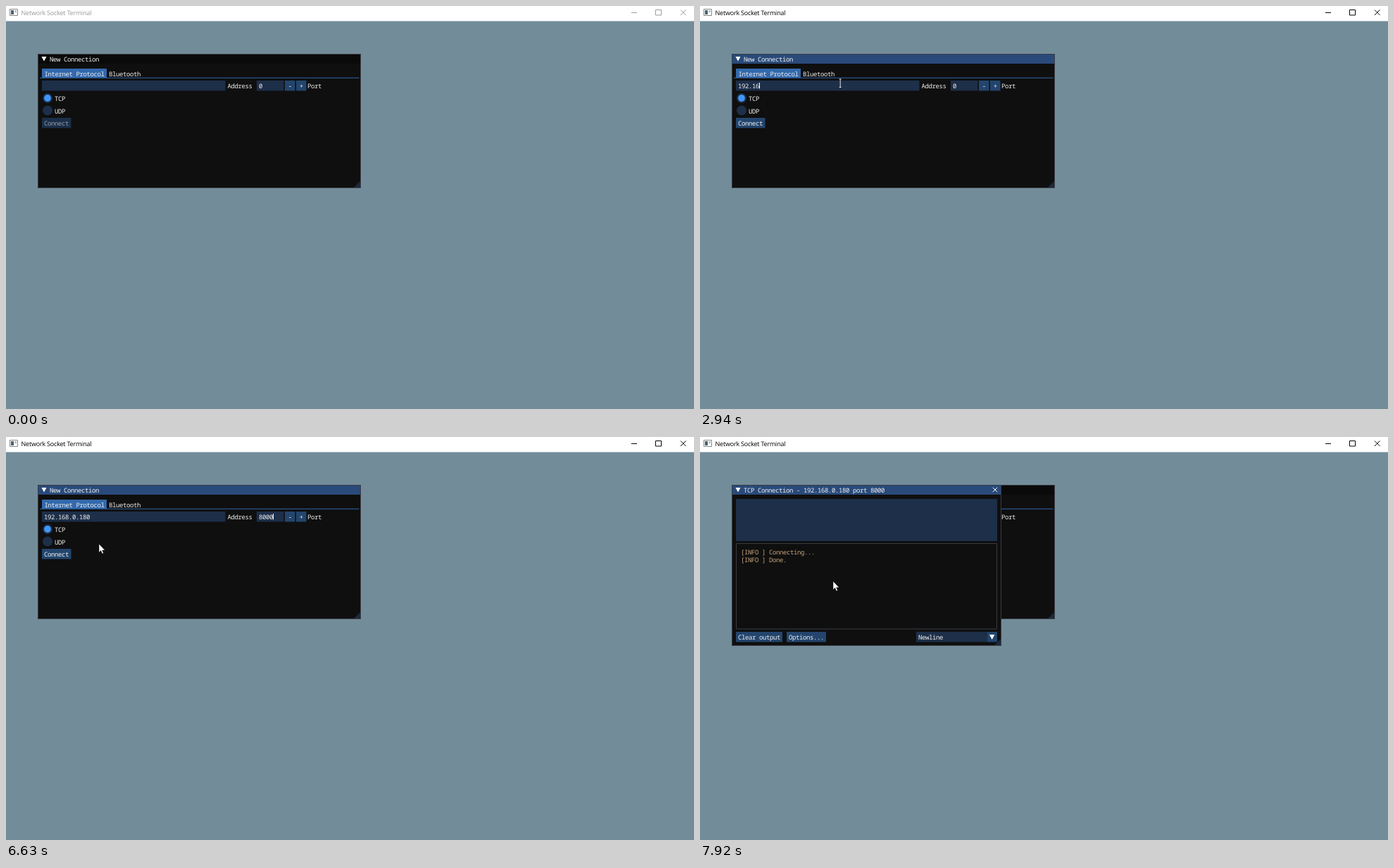
Animation of 977x573 px, one loop 7.99 s. Source, as an HTML page:

```html
<!DOCTYPE html>
<html lang="en">
<head>
<meta charset="utf-8">
<title>Network Socket Terminal</title>
<style>
  html, body { margin: 0; width: 100%; height: 100%; overflow: hidden; background: #738c99; }
  svg { display: block; width: 977px; height: 573px; }
  text {
    font: 9px "Noto Sans Mono", "DejaVu Sans Mono", monospace;
    letter-spacing: -.4px; fill: #f0f0f0; white-space: pre;
    text-rendering: geometricPrecision;
  }
  #caption text { font: 9px "Open Sans", "Noto Sans", sans-serif; letter-spacing: -.2px; fill: currentColor; }
</style>
</head>
<body>
<svg id="stage" width="977" height="573" viewBox="0 0 977 573"></svg>
<script>
const LOOP = 7990;
const C = {
  window: '#0f0f0f', border: '#3b3c43', title: '#294a7a', titleOff: '#0a0a0a',
  field: '#1d2f49', button: '#23456d', hover: '#4296fa', pressed: '#0f87fa',
  disabled: '#1b2f49', tab: '#3369ad', grip: '#1a2a3e', select: '#2a5387',
  text: '#f0f0f0', dim: '#929ba5', log: '#c9a27c'
};

const stage = document.getElementById('stage');

function add(parent, tag, attrs = {}, content) {
  const el = document.createElementNS('http://www.w3.org/2000/svg', tag);
  set(el, attrs);
  if (content !== undefined) el.textContent = content;
  return parent.appendChild(el);
}
function set(el, attrs) {
  for (const key in attrs) el.setAttribute(key, attrs[key]);
}
const group = (parent, id) => add(parent, 'g', id ? { id } : {});
const rect = (p, x, y, width, height, fill) => add(p, 'rect', { x, y, width, height, fill });
const shape = (p, d, fill) => add(p, 'path', { d, fill });
const line = (p, d, stroke, width = 1) =>
  add(p, 'path', { d, fill: 'none', stroke, 'stroke-width': width });
const label = (p, x, y, str, fill = C.text) => add(p, 'text', { x, y, style: `fill:${fill}` }, str);
const show = (el, on) => set(el, { visibility: on ? 'visible' : 'hidden' });

function button(p, x, y, w, str) {
  const box = rect(p, x, y, w, 14.5, C.button);
  return { box, text: label(p, x + 3, y + 11, str) };
}

function panel(p, w, h, name) {
  rect(p, 45, 68, w, h, C.window);
  const bar = rect(p, 45, 68, w, 14, C.title);
  const r = 45 + w, b = 68 + h;
  shape(p, `M${r} ${b}h-11l11 -11z`, C.grip);
  line(p, `M45.5 68.5h${w - 1}v${h - 1}h${1 - w}z`, C.border);
  shape(p, 'M50.5 72h7l-3.5 6.5z', '#fff');
  label(p, 62, 79, name);
  return bar;
}

// Desktop and caption bar
rect(stage, 0, 0, 977, 573, '#738c99');
rect(stage, 0, 0, 977, 21.5, '#fff');
const caption = group(stage, 'caption');
add(caption, 'text', { x: 21.5, y: 13 }, 'Network Socket Terminal');
line(caption, 'M888 9.5h8M922.5 5.5h8v7.5h-8zM958 5.5l7.5 7.5M965.5 5.5l-7.5 7.5', 'currentColor');
line(stage, 'M5.5 4.5h11v9h-11z', '#85898c');
rect(stage, 7, 6, 4, 6, '#4b6272');
rect(stage, 12.5, 6, 2.5, 3, '#b4bbc0');

// New connection form
const form = group(stage);
const formBar = panel(form, 459, 191, 'New Connection');
rect(form, 51, 89, 92, 13, C.tab);
rect(form, 48, 101.7, 453.5, 1, C.tab);
label(form, 54.5, 100, 'Internet Protocol');
label(form, 146, 100, 'Bluetooth');
rect(form, 51, 106, 260.5, 14.5, C.field);
label(form, 314.5, 117, 'Address');
rect(form, 356, 106, 38.5, 14.5, C.field);
for (const [x, sign] of [[396, '-'], [412, '+']]) {
  rect(form, x, 106, 14.5, 14.5, C.button);
  label(form, x + 4.8, 117, sign);
}
label(form, 428, 117, 'Port');
for (const [y, name] of [[131, 'TCP'], [148.5, 'UDP']]) {
  add(form, 'circle', { cx: 59, cy: y, r: 7, fill: C.field });
  label(form, 69, y + 4, name);
}
add(form, 'circle', { cx: 59, cy: 131, r: 4.9, fill: C.hover });
const connect = button(form, 51, 159, 41.5, 'Connect');
const selection = rect(form, 359, 107, 5.5, 12, C.select);
const address = label(form, 54, 117, '');
const port = label(form, 359, 117, '0');
const caret = rect(form, 54, 109, 1, 8.5, '#fff');

// Session window
const session = group(stage);
panel(session, 383, 229, 'TCP Connection - 192.168.0.180 port 8000');
line(session, 'M415.8 71.8l6.4 6.4M422.2 71.8l-6.4 6.4', '#fff');
rect(session, 51, 88, 371, 60, C.field);
line(session, 'M51.5 151.5h370v121.5h-370z', C.border);
label(session, 58, 166.5, '[INFO ] Connecting...', C.log);
const done = label(session, 58, 177.5, '[INFO ] Done.', C.log);
button(session, 51, 277, 66, 'Clear output');
button(session, 123, 277, 56, 'Options...');
rect(session, 307, 277, 101, 14.5, C.field);
rect(session, 408, 277, 14, 14.5, C.button);
shape(session, 'M411 281h7.4l-3.7 7z', '#fff');
label(session, 310, 288, 'Newline');

// Pointer
const halo = add(stage, 'circle', { r: 9.3, fill: '#fff000', 'fill-opacity': .58 });
const arrow = add(stage, 'path', {
  d: 'M0 0V12.2L2.7 9.6L4.6 14L6.5 13.2L4.7 9H8.5Z',
  fill: '#fff', stroke: '#000', 'stroke-width': .5
});
const beam = line(stage, 'M197.7 104h3M199.2 104v11.5M197.7 115.5h3', '#e4e4e4');

const ADDRESS = '192.168.0.180', PORT = '8000';
const addressKeys = [2010, 2210, 2340, 2540, 2740, 2940, 3210, 3410, 3610, 3880, 4080, 4350, 4500];
const portKeys = [5960, 6090, 6230, 6360];
const typed = (keys, t) => keys.filter(k => k <= t).length;

// Each move: start, end, number of held positions, from, to, easing
const inOut = u => u * u * (3 - 2 * u);
const out = u => 1 - (1 - u) ** 2;
const moves = [
  [270, 810, 9, [881, 537], [197, 109.5], inOut],
  [6430, 6630, 4, [190, 116], [132, 152], u => u],
  [6700, 6840, 3, [112, 157], [62, 164.5], out],
  [7510, 7920, 7, [64, 166], [189, 205], inOut]
];

function pointer(t) {
  let pos = moves[0][3];
  for (const [start, end, count, from, to, ease] of moves) {
    if (t < start) break;
    const step = (end - start) / (count - 1);
    // The small allowance absorbs times rounded to 10 ms.
    const held = Math.min(count - 1, Math.floor((t - start + 4) / step));
    const u = ease(held / (count - 1));
    pos = from.map((v, i) => v + (to[i] - v) * u);
    if (start === 270 && t >= end) pos = [197, 109.5];
  }
  return pos;
}

function draw(t) {
  const within = (a, b) => t >= a && t < b;
  const opened = t >= 7180;
  const n = typed(addressKeys, t), m = typed(portKeys, t);

  caption.style.color = t < 1130 ? '#999' : '#000';
  set(formBar, { fill: within(1210, 7180) ? C.title : C.titleOff });
  address.textContent = ADDRESS.slice(0, n);
  port.textContent = m ? PORT.slice(0, m) : '0';
  show(selection, within(4830, portKeys[0]));
  show(caret, within(1280, 4830) || within(portKeys[0], 7040));
  set(caret, { x: t < 4830 ? 54 + 5 * n : 359 + 5 * m });

  const face = t >= 7040 ? C.pressed : t >= 6770 ? C.hover : n ? C.button : C.disabled;
  set(connect.box, { fill: face });
  connect.text.style.fill = n ? C.text : C.dim;

  show(session, opened);
  show(done, t >= 7250);

  const [x, y] = pointer(t);
  const onField = within(810, 4830);
  show(beam, onField);
  show(arrow, t >= 270 && !onField);
  set(arrow, { transform: `translate(${x} ${y})` });
  show(halo, within(1060, 1280) || within(7040, 7250));
  set(halo, { cx: x, cy: y });
}

const begin = performance.now();
function tick() {
  draw((performance.now() - begin) % LOOP);
  requestAnimationFrame(tick);
}
tick();
</script>
</body>
</html>
```
